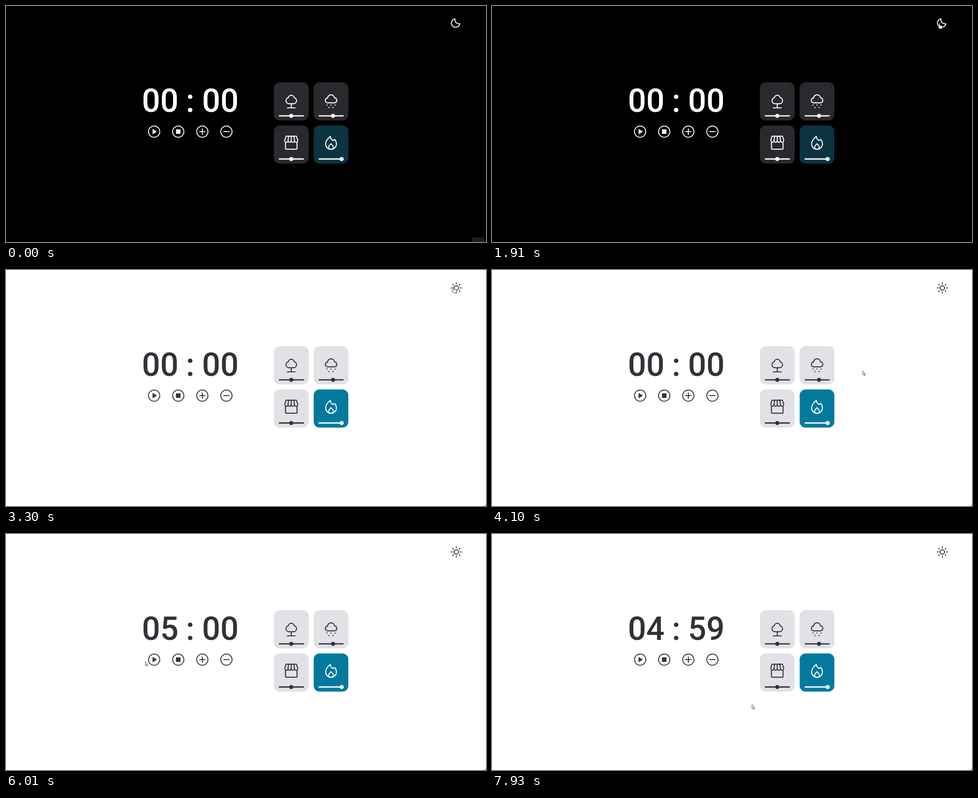
An HTML page for the animation above (7.99 s loop, 1066 px wide and 526 px high).

```html
<!DOCTYPE html>
<html lang="en">
<head>
<meta charset="utf-8">
<title>Focus timer</title>
<style>
  html, body { margin: 0; width: 100%; height: 100%; overflow: hidden; background: #000; }
  svg {
    display: block; width: 1066px; height: 526px; background: var(--bg);
    --bg: #000; --fg: #fff; --card: #29292e; --active: #0a3442;
  }
  svg.light { --bg: #fff; --fg: #323238; --card: #e1e1e6; --active: #02799d; }
  text { font: 500 71.5px Roboto, sans-serif; text-anchor: middle; fill: var(--fg); }
  .line { fill: none; stroke: var(--fg); stroke-width: 2.2; stroke-linecap: round; stroke-linejoin: round; }
  .thin { stroke-width: 2; }
  .solid { fill: var(--fg); }
  .on { --fg: #fff; }
  .pointer { fill: #fff; stroke: #222; stroke-width: .8; stroke-linejoin: round; }
</style>
</head>
<body>
<svg id="stage" viewBox="0 0 1066 526">
  <path id="moon" class="line thin" d="M997 28.6A9.5 9.5 0 1 0 1008 39.6A9.5 9.5 0 0 1 997 28.6Z"/>
  <g id="sun" class="line thin" transform="translate(1000 40)"></g>

  <text id="min" x="342.4" y="236.4">00</text>
  <text x="409" y="236.4">:</text>
  <text id="sec" x="476" y="236.4">00</text>

  <g id="buttons" class="line thin"></g>
  <g id="cards"></g>

  <rect id="badge" x="1036" y="516" width="26" height="10" fill="#1f1f1f"/>
  <path id="corner" d="M1066 523.5V526H1063.5Z" fill="#222"/>
  <circle id="press" r="7" fill="#fff000" opacity=".7"/>
  <path id="pointer" class="pointer"/>
</svg>
<script>
const $ = id => document.getElementById(id);
const range = n => [...Array(n).keys()];
const repeat = (n, draw) => range(n).map(draw).join('');
const LOOP = 7990, STEP = 66;
const ARROW = 'M.4 .4V9.2L2.4 7.4L3.8 10.6L5.2 10L3.9 6.9H6.6Z';
const HAND = 'M-1.2 7.8V1.4a1.1 1.1 0 0 1 2.2 0V5.2q5.2 .2 5.3 2.4V10L5.4 13H-.2L-3.2 8.6q-.2-1.5 1.1-1.2Z';
const buttonX = range(4).map(i => 329 + 53.5 * i);

$('sun').innerHTML = '<circle r="5"/>' + repeat(8, i => `<path d="M9 0h2.3" transform="rotate(${i * 45})"/>`);

// Play, stop, plus, minus
const signs = [
  '<path class="solid" stroke="none" d="M-3.5-6L6.2 0L-3.5 6Z"/>',
  '<path class="solid" stroke="none" d="M-5-5H5V5H-5Z"/>',
  '<path stroke-linecap="butt" d="M-6.7 0H6.7M0-6.7V6.7"/>',
  '<path stroke-linecap="butt" d="M-6.7 0H6.7"/>',
];
$('buttons').innerHTML = repeat(4, i =>
  `<g transform="translate(${buttonX[i]} 280)"><circle r="12.5"/>${signs[i]}</g>`);

// Icons, drawn around the middle of a card
const drops = repeat(5, i =>
  `<circle class="solid" stroke="none" r="1.3" cx="${i * 4.5 - 9}" cy="${i % 2 ? 14.2 : 8.7}"/>`);
const scallops = repeat(4, () => 'a3.6 4.6 0 0 1-7.2 0');
const slats = repeat(3, i => `M${7.2 * (i - 1)}-9L${5.8 * (i - 1)}-18`);
const icons = [
  '<path d="M-5.3 5.8A6.8 6.8 0 0 1-6.5-7.6A6.6 6.6 0 0 1 6.5-7.6A6.8 6.8 0 0 1 5.3 5.8ZM0 5.8V15M-8.8 15H8.8"/>',
  '<path d="M-8.5 3.8A5.4 5.4 0 0 1-7.7-6.8A7.8 7.8 0 0 1 7.8-7.4A5.7 5.7 0 0 1 8.3 3.8Z"/>' + drops,
  `<path d="M-11.4-18H11.4L14.4-9${scallops}Z${slats}M-12.8-4.5V9q0 2 2 2H10.8q2 0 2-2V-4.5"/>`,
  '<path d="M-1.6-17.6C-1.2-13 1.5-9 5-8.6Q7-9 7.8-10.8C10.6-8 12-4.5 12-.8A12 12 0 0 1-12-.8C-12-7.5-6.5-13.5-1.6-17.6Z"/>' +
  '<path d="M0-1.3C-2 1.7-5.3 3-5.3 6.2a5.3 5 0 0 0 10.6 0C5.3 3 2 1.7 0-1.3Z"/>',
];
const levels = [.5, .58, .5, .92];

$('cards').innerHTML = repeat(4, i => {
  const on = i === 3;
  return `<g class="${on ? 'on' : ''}" transform="translate(${633.5 + 88.3 * (i % 2)} ${212 + 96.2 * (i >> 1)})">
    <rect x="-38.5" y="-42" width="77" height="85" rx="13" fill="var(--${on ? 'active' : 'card'})"/>
    <g class="line">${icons[i]}<path stroke-width="2.8" d="M-26.5 32.8h53.5"/></g>
    <circle class="solid" cx="${(levels[i] - .5) * 56}" cy="32.8" r="4.6"/></g>`;
});

// Pointer path: first step, last step, end, optional bend
const stops = [
  [14, 14, 729, 495],
  [14, 26, 965, 55, 1120, 200],
  [26, 29, 994, 38],
  [57, 70, 539, 297, 720, 397],
  [70, 71, 500, 291.5],
  [71, 77, 441, 288],
  [86, 91, 309, 284],
  [93, 96, 329, 281.5],
  [99, 110, 601, 403, 778, 652],
  [110, 113, 583, 382],
  [118, 120, 577, 380],
];
const presses = [48, 80, 98];

function pointerAt(n) {
  const i = Math.max(1, stops.findLastIndex(s => n >= s[0]));
  const [, , x0, y0] = stops[i - 1];
  const [a, b, x1, y1, cx = (x0 + x1) / 2, cy = (y0 + y1) / 2] = stops[i];
  const p = Math.min(1, Math.max(0, (n - a) / (b - a)));
  const e = p * p * (3 - 2 * p);
  const curve = (u, c, v) => u * (1 - e) ** 2 + 2 * c * e * (1 - e) + v * e * e;
  return [curve(x0, cx, x1), curve(y0, cy, y1)];
}

const near = (x, y, cx, cy) => Math.abs(x - cx) < 14 && Math.abs(y - cy) < 14;
const show = (id, on) => $(id).style.display = on ? '' : 'none';
const pad = v => String(v).padStart(2, '0');

function draw(now) {
  const t = now % LOOP, n = Math.floor((t + 6) / STEP);
  const light = n >= 50;
  $('stage').setAttribute('class', light ? 'light' : '');
  show('moon', !light);
  show('sun', light);
  show('corner', light);
  show('badge', t < 70);

  const left = n < 82 ? 0 : n < 114 ? 300 : 299;
  $('min').textContent = pad(Math.floor(left / 60));
  $('sec').textContent = pad(left % 60);

  const [x, y] = pointerAt(n);
  const hover = near(x, y, 999, 39) || buttonX.some(b => near(x, y, b, 280));
  show('pointer', n >= 14);
  show('press', presses.some(p => n >= p && n < p + 2));
  $('pointer').setAttribute('d', hover ? HAND : ARROW);
  for (const id of ['pointer', 'press']) $(id).setAttribute('transform', `translate(${x} ${y})`);
  requestAnimationFrame(draw);
}
requestAnimationFrame(draw);
</script>
</body>
</html>
```
